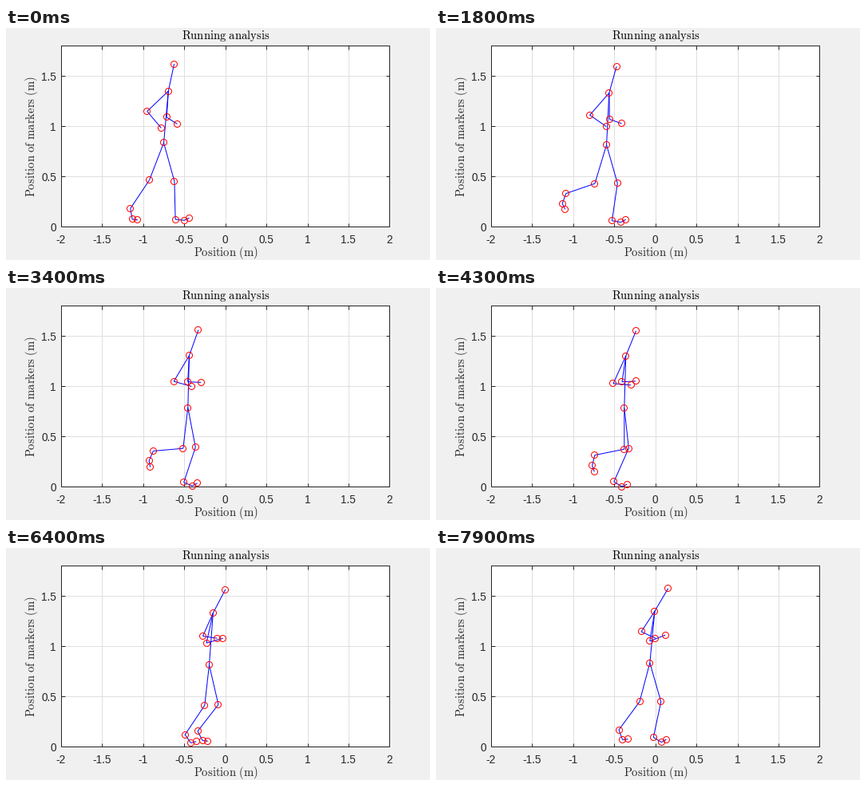
A matplotlib script for the animation above (8000 ms loop, 531 by 291 pixels).

```python
import numpy as np
import matplotlib.pyplot as plt
from matplotlib.animation import FuncAnimation
from matplotlib.collections import LineCollection
from matplotlib.patches import Rectangle

W, H, DPI = 531, 291, 100
FRAMES, STEP = 80, 100
PX = 72 / DPI  # points per pixel
INK, GRID = "#262626", "#dfdfdf"
LEFT, RIGHT, TOP, BOTTOM = 69.5, 480.9, 22.5, 249.5

plt.rcParams["font.family"] = "Liberation Sans"
plt.rcParams["mathtext.fontset"] = "cm"

# Each bone swings from its parent joint like a pendulum:
# parent, length (m), mean angle, swing (degrees from straight down),
# time of the extreme (s), rate (rad/s), apparent growth (m/s).
BONES = {
    "shoulder": ("hip", 0.518, 175.8, 2.4, 3.6, 0.72, 0),
    "head": ("shoulder", 0.278, 154.8, -12.7, 10.2, 0.25, 0),
    "elbow_a": ("shoulder", 0.328, -31.7, 20.3, 8.0, 0.39, -0.003),
    "wrist_a": ("elbow_a", 0.238, 74, 34, 8.2, 0.31, -0.005),
    "elbow_b": ("shoulder", 0.262, -20.5, 21.5, 1.75, 0.42, 0),
    "wrist_b": ("elbow_b", 0.145, 77.5, 15, 4.6, 0.65, 0.005),
    "knee_a": ("hip", 0.41, -3, 22.3, 7.8, 0.41, 0),
    "ankle_a": ("knee_a", 0.365, -44, -42, 3.3, 0.51, 0),
    "heel_a": ("ankle_a", 0.11, 21, -51, 2.8, 0.5, 0),
    "toe_a": ("heel_a", 0.065, 66, -53, 3.2, 0.6, 0),
    "knee_b": ("hip", 0.405, -3, 23, 1.0, 0.33, 0),
    "ankle_b": ("knee_b", 0.378, -16, -26, 8.0, 0.29, 0),
    "heel_b": ("ankle_b", 0.108, 45, 40, 0.5, 0.285, 0),
    "toe_b": ("heel_b", 0.067, 102, 12, 2.0, 0.36, 0),
}


def to_px(x, y):
    """Metres on the chart to stage pixels."""
    return np.array([LEFT + (x + 2) / 4 * (RIGHT - LEFT),
                     BOTTOM - y / 1.8 * (BOTTOM - TOP)])


def pose(t):
    """Joint positions in metres at t seconds."""
    dip = 0.0515 * np.sin(np.pi * t / 8.2) ** 2
    joints = {"hip": np.array([-0.755 + 0.0865 * t, 0.8366 - dip])}
    for name, (parent, length, mean, swing, peak, rate, grow) in BONES.items():
        angle = np.radians(mean + swing * np.cos(rate * (t - peak)))
        reach = length + grow * t
        joints[name] = joints[parent] + reach * np.array([np.sin(angle), -np.cos(angle)])
    return joints


fig = plt.figure(figsize=(W / DPI, H / DPI), dpi=DPI, facecolor="#f0f0f0")
ax = fig.add_axes([0, 0, 1, 1])
ax.set(xlim=(0, W), ylim=(H, 0))
ax.axis("off")


def line(x, y, color, z):
    # Whole coordinates snap to the centre of that pixel.
    ax.plot(np.floor(x), np.floor(y), color=color, lw=PX, zorder=z, solid_capstyle="butt")


def label(x, y, text, size, color=INK, **kw):
    ax.text(x, y, text, fontsize=size, color=color, va="baseline", **kw)


def roman(text):
    return r"$\mathrm{%s}$" % text.replace(" ", r"\ ")


ax.add_patch(Rectangle((LEFT, TOP), RIGHT - LEFT, BOTTOM - TOP, fc="white", ec="none", zorder=0))
line([LEFT, RIGHT, RIGHT, LEFT, LEFT], [TOP, TOP, BOTTOM, BOTTOM, TOP], INK, 3)

TICK, SMALL, LARGE = 4.5, 13.6 * PX, 14.67 * PX
for v in np.arange(-2, 2.1, 0.5):
    x, _ = to_px(v, 0)
    if abs(v) < 2:
        line([x, x], [TOP, BOTTOM], GRID, 1)
        line([x, x], [BOTTOM, BOTTOM - TICK], INK, 3)
        line([x, x], [TOP, TOP + TICK], INK, 3)
    label(x - 0.7, 270, f"{v:g}".replace("\u2212", "-"), SMALL, ha="center")
for v in np.arange(0, 1.6, 0.5):
    _, y = to_px(0, v)
    if v > 0:
        line([LEFT, RIGHT], [y, y], GRID, 1)
        line([LEFT, LEFT + TICK], [y, y], INK, 3)
        line([RIGHT, RIGHT - TICK], [y, y], INK, 3)
    label(63, y + 5.5, f"{v:g}", SMALL, ha="right")

label(275, 14, roman("Running analysis"), LARGE, "black", ha="center")
label(275, 286.5, roman("Position (m)"), LARGE, ha="center")
label(36, 136, roman("Position of markers (m)"), LARGE, ha="center",
      rotation=90, rotation_mode="anchor")

bones = ax.add_collection(LineCollection([], colors="blue", linewidths=PX, zorder=4))
dots = ax.scatter([], [], s=(8 * PX) ** 2, facecolors="none", edgecolors="red",
                  linewidths=PX, zorder=5)


def update(i):
    joints = {name: to_px(*p) for name, p in pose(i * STEP / 1000).items()}
    bones.set_segments([[joints[bone[0]], joints[name]] for name, bone in BONES.items()])
    dots.set_offsets(np.floor(list(joints.values())) + 0.5)
    return bones, dots


anim = FuncAnimation(fig, update, frames=FRAMES, interval=STEP, repeat=True, repeat_delay=0)
plt.show()
```
